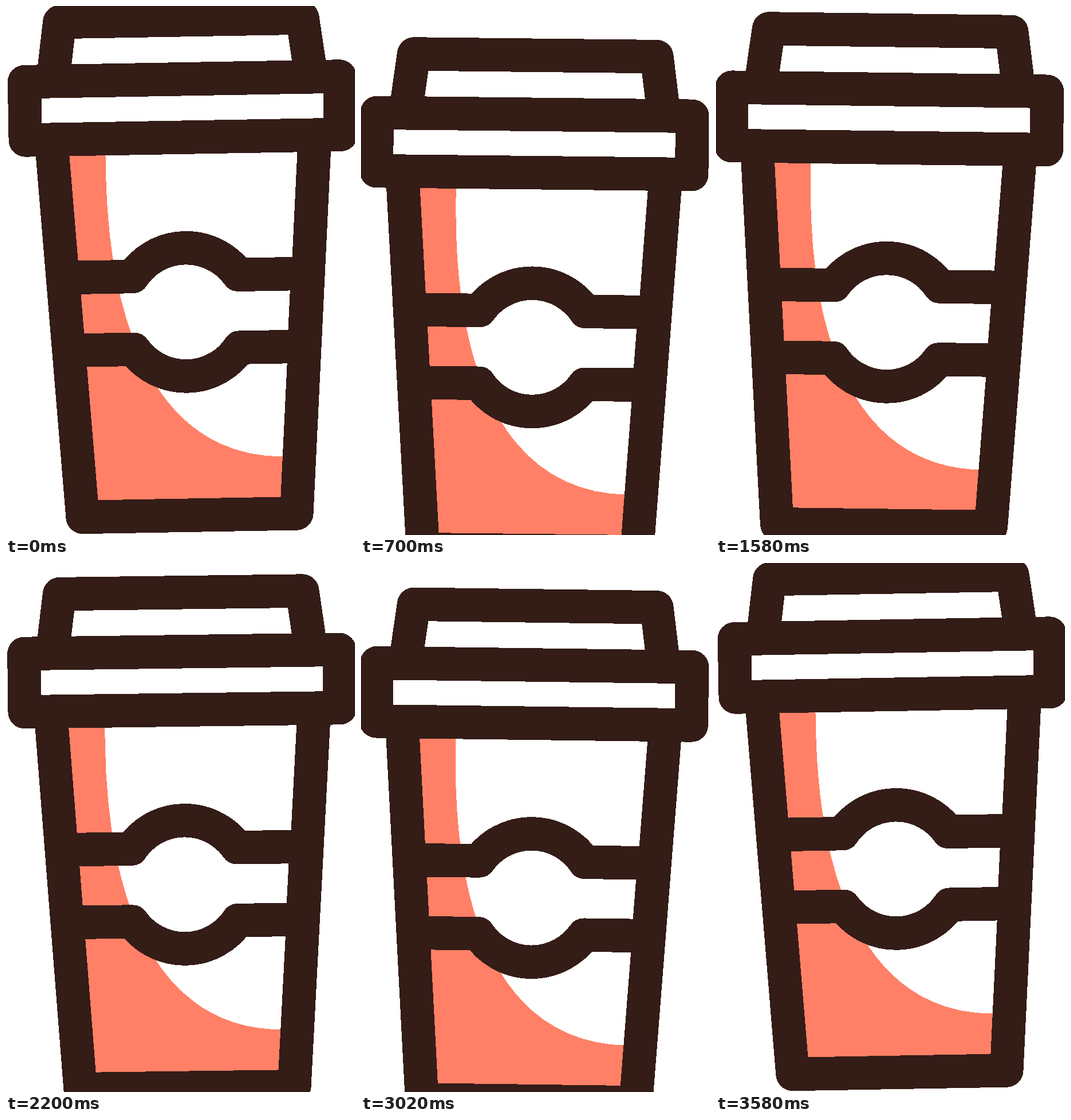
Recreate the animation shown at these times as an HTML page. Size 608 by 921 pixels, loop 3.6 s.

```html
<!DOCTYPE html>
<html lang="en">
<head>
<meta charset="utf-8">
<title>Coffee cup</title>
<style>
  html, body { margin: 0; width: 100%; height: 100%; overflow: hidden; background: #fff; }
  svg { display: block; width: 100vw; height: 100vh; }
  .line { fill: none; stroke: #341c17; stroke-width: 58.4; stroke-linejoin: round; }
</style>
</head>
<body>
<svg viewBox="0 0 608 921" shape-rendering="crispEdges">
  <!-- cup axis is x = 0, the lid's inner top edge is y = 0 -->
  <g id="cup">
    <path id="shade" fill="#ff8066" d="M-228 90H-135.5V125C-135.5 435 -36 631 170 631H190L186 730H-186Z"/>
    <path id="body" class="line" d="M-229.7 72L-186.4 730.3H186.4L229.7 72"/>
    <path id="label" class="line" d="M-211 313H-92A111.8 111.8 0 0 1 92 313H212.8L204.5 439.8H92A111.8 111.8 0 0 1 -92 439.8H-203"/>
    <path id="lid" class="line" d="M-225.3 -29L-211.6 -132.2H211.6L225.3 -29"/>
    <rect id="rim" class="line" x="-274.7" y="-29.2" width="549.4" height="101.4"/>
  </g>
</svg>
<script>
  const LOOP = 3600;
  const AXIS = 304.2;
  const PIVOT = -172; // above the lid, in cup coordinates
  const LEFT = -1, RIGHT = 0.75; // tilt limits in degrees

  const cup = document.getElementById('cup');
  const ease = u => (1 - Math.cos(Math.PI * u)) / 2;
  const mix = (a, b, u) => a + (b - a) * u;

  // Turning points of the bob and of the swing, which alternates left and right.
  const bob = { times: [0, 710, 1910, 2700, LOOP], value: i => [156.5, 218, 165.2, 226.5, 156.5][i] };
  const swing = { times: [0, 600, 1200, 1600, 2400, 3000, LOOP], value: i => i % 2 ? RIGHT : LEFT };

  function valueAt({ times, value }, t) {
    const i = times.findIndex(end => t < end);
    const u = (t - times[i - 1]) / (times[i] - times[i - 1]);
    return mix(value(i - 1), value(i), ease(u));
  }

  function draw(t) {
    const y = valueAt(bob, t);
    const angle = valueAt(swing, t);
    cup.setAttribute('transform',
      `translate(${AXIS} ${y.toFixed(2)}) rotate(${angle.toFixed(3)} 0 ${PIVOT})`);
  }

  const start = performance.now();
  function tick() {
    draw((performance.now() - start) % LOOP);
    requestAnimationFrame(tick);
  }
  draw(0);
  requestAnimationFrame(tick);
</script>
</body>
</html>
```
